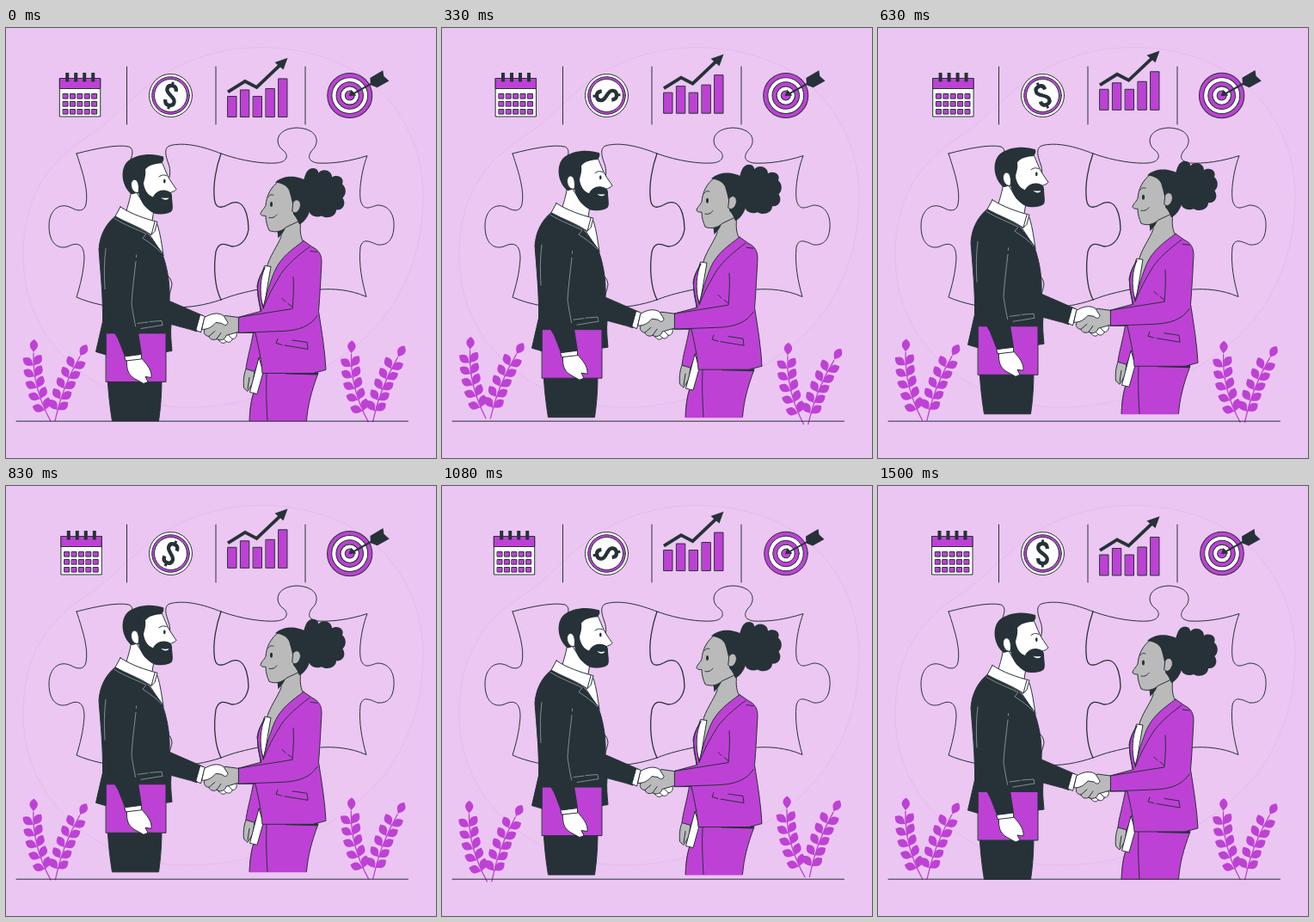
Animation of 500x500 px, one loop 1540 ms. Source, as an HTML page:

```html
<!DOCTYPE html>
<html lang="en">
<head>
<meta charset="utf-8">
<title>Business deal</title>
<style>
html, body { margin: 0; width: 100%; height: 100%; overflow: hidden; background: #ebc6f2; }
svg { display: block; width: 100%; height: 100%; }
.p { fill: #be41d5; }
.w { fill: #fff; }
.d { fill: #263238; }
.g { fill: #bababa; }
.n { fill: none; }
.o { stroke: #263238; stroke-width: 1; stroke-linejoin: round; stroke-linecap: round; }
.l { fill: none; stroke: #9aa3a7; stroke-width: .8; stroke-linecap: round; }
</style>
</head>
<body>
<svg viewBox="0 0 500 500" xmlns="http://www.w3.org/2000/svg">
  <path d="M20 265C20 200 45 160 90 130C130 105 150 72 190 50C250 15 330 15 390 42C450 70 485 130 485 195C485 300 430 360 370 395C310 430 260 441 210 441C110 440 20 370 20 265Z" fill="#ebc7f1" stroke="#e2b6ea" stroke-width=".7"/>

  <g class="n o">
    <path d="M82 146C105 140 130 135 143 138C150 141 146 150 144 156C140 175 150 190 167 190C188 190 194 172 189 158C186 150 183 140 190 137C207 132 230 138 250 146"/>
    <path d="M82 146C90 170 96 190 93 205C91 214 83 213 76 209C62 202 50 212 50 230C50 250 60 258 72 254C84 248 91 252 91 268C90 285 86 300 82 313C98 320 120 325 138 325C155 324 146 312 146 300C147 275 191 276 193 298C192 308 184 318 194 324C212 326 232 322 250 316"/>
    <path d="M250 146C245 160 240 182 242.500 200C244 211 252 209 258 205.500C262 203 267 202 271 203.500C279 207 282 222 282 234C280 247 272 254 263 254C255 252 248 247 244 260C241 280 243 302 250 316" stroke-width="1.300"/>
    <path d="M250 146C275 155 300 158 314 157C328 156 329 147 322 142C312 135 313 117 338 116C364 117 365 134 356 142C350 150 352 155 362 157C380 158 400 155 420 148.500C412 170 410 195 413 203C417 213 424 208 432 206C446 206 452 218 451 232C450 248 442 253 432 252C424 249 415 243 412 255C410 275 414 295 419 312.500C400 304 380 303 366 304M250 316C265 310 279 307 293 304"/>
  </g>
  <path class="o" d="M140.500 45V112M244 45V112M348 45V112"/>

  <g id="calendar">
    <path class="w o" d="M63 58.500H110V103H63Z"/>
    <path class="p o" d="M63 58.500H110V70.500H63Z"/>
    <path class="d" d="M69.500 52h4v10.500h-4zM79.500 52h4v10.500h-4zM89.500 52h4v10.500h-4zM99.500 52h4v10.500h-4z"/>
    <g id="days" class="p o"></g>
  </g>

  <g class="o">
    <circle class="w" cx="191.500" cy="78.500" r="25"/>
    <circle class="p" cx="191.500" cy="78.500" r="21.800"/>
    <circle class="w" cx="191.500" cy="78.500" r="19"/>
  </g>
  <g id="dollar" class="n" stroke="#263238">
    <path stroke-width="4.300" d="M5.300 -5.500C5.300 -9.500 3.500 -11.500 0 -11.500C-3.600 -11.500 -5.300 -9.500 -5.300 -6.500C-5.300 -1 5.300 1 5.300 6.500C5.300 9.500 3.600 11.500 0 11.500C-3.500 11.500 -5.300 9.500 -5.300 5.500"/>
    <path stroke-width="3" d="M0 -16V-11M0 11V16"/>
  </g>

  <g id="chart">
    <path class="p o" d="M258 80h10v24h-10zM272.800 72.500h10v31.500h-10zM287.500 80h10v24h-10zM302.300 71h10v33h-10zM317 59.500h10v44.500h-10z"/>
    <path class="n" stroke="#263238" stroke-width="3.800" d="M258 75L278 62.500L291.500 69.500L321 41.500"/>
    <path class="d" d="M327.500 35.300L312.500 40.500L322.500 49Z"/>
  </g>

  <g id="target">
    <g class="o">
      <circle class="p" cx="400" cy="78.500" r="25.300"/>
      <circle class="w" cx="400" cy="78.500" r="20.300"/>
      <circle class="p" cx="400" cy="78.500" r="15.300"/>
      <circle class="w" cx="400" cy="78.500" r="10.300"/>
      <circle class="p" cx="400" cy="78.500" r="5.300"/>
    </g>
    <path stroke="#263238" stroke-width="2" d="M401 78L428 63"/>
    <path class="d" d="M399 79L401.500 72L407.500 78.500ZM423 58.500L437.500 50L438.500 56.500L444.500 62L431 69.500L423.500 66.500Z"/>
  </g>

  <g id="plants"></g>

  <g id="people">
    <!-- man -->
    <path class="d o" d="M118 405C119 425 121 442 123.500 457.500H177.500C180 440 181 425 181 405Z"/>
    <path class="w o" d="M146 186C145 198 142 206 140 213L169 231L172 212Z"/>
    <path class="w o" d="M152 160L181 156C185 165 187 171 190 176C193 181 196 185 198 188C196 191 193 191 191 192L191 212L162 208L152 192Z"/>
    <path class="d" d="M146 194C134 184 132 164 142 155C152 147 170 145.500 183 150C184 153 183 156 180 158C173 158 166 160 162 165C163 172 161 176 160 181C161 189 165 195 171 197C174 191 180 188 186 189.500C190 190 193 192 193 196C193 203 195 209 193 213C190 217 178 218 172 216C162 211 156 202 154 192Z"/>
    <path class="w" d="M180.500 197.500C183 198.500 186 198.500 189.500 198C188 201 183 201 180.500 197.500Z"/>
    <path class="w o" d="M154 192C147 194 143 182 147 178C151 174 156 180 154 192Z"/>
    <ellipse class="d" cx="184.300" cy="178.500" rx="1.300" ry="2.500"/>
    <path class="n o" stroke-width="1.700" d="M178 173.500C181 171 184 171 187 172.500"/>
    <path class="w o" d="M163 234L176 229C180 242 181 252 183 265Z"/>
    <path class="d o" d="M127.500 219C115 229 109 243 108 258C110 285 113 315 112.500 342L104.500 377L118 381L186 377L193 376C192 365 191 356 192 345C202 348 212 350 222 353.500L229 335L190 318C191 296 187 277 181 261L164 239Z"/>
    <path class="w o" d="M133 208.500L127 219.500C140 227 156 232 169 241L173 237L176 226C161 222 146 217 133 208.500Z"/>
    <path class="n o" d="M173 226L169 241"/>
    <path class="l" d="M126 222C139 230 151 234 163 240L159 245C167 250 175 256 181 262M116 257C114 273 114 287 115 304M151.500 264.500V267M151 272C149 289 147 305 146 321C148 335 150 345 152.500 355M153 344L165 342.500M167 342L181 341L182 346L157 350"/>
    <path class="p o" d="M116.500 355.500H186V412H116.500Z"/>
    <path class="d" d="M120 345L130 362L138 382.500L158 380L153 348Z"/>
    <path class="w o" d="M140.500 386C140 398 142 403 149 408L160 414L165 412L162 406L169 407C170 398 163 391 158 385Z"/>
    <path class="w o" d="M138 382.500L157.500 380V385.500L139.500 387.500Z"/>
    <path class="w o" d="M226 334L231.500 336L226.500 354.500L221 352Z"/>

    <!-- woman, far arm and legs -->
    <path class="g o" d="M279 397C276 405 276 412 276.500 419L281 423L287 413L289 399ZM281 420L283 407"/>
    <path class="p o" d="M288 352C285 371 280 386 279 397L289 400L299 375V352Z"/>
    <path class="p" d="M298 400C285 424 283 440 283 458H349.500C351 439 355 423 363 402Z"/>
    <path class="n o" d="M298 401C285 425 284 440 283 457M303 402C302 421 303 440 304 457M363 402C355 423 351 439 349.500 457"/>
    <path class="w o" d="M294 384L283.500 424L292 426L299 401Z"/>
    <path class="d" d="M325 399L363.500 399L362 404L325 403Z"/>

    <!-- woman, head -->
    <path class="d" d="M344 181C348 176 347 167 354 164C360 162 363 166 363.500 169C368 163 379 166 379 174C386 170 394 175 391 182C396 186 396 194 391.500 198C396 205 392 213 384 212C384 220 373 223 367 219C360 222 351 218 353 211C346 212 344 205 344 200Z"/>
    <path class="g o" d="M319 232L320 243C316 254 306 266 303 280L300 326L346 250C341 241 342 232 343 222Z"/>
    <path class="d" d="M315 233L325 232C324 237 320 241 316.500 245Z"/>
    <path class="g o" d="M318 178C307 186 303 196 302 207C300 211 296 214 296 217C297 219 300 219 302 219C302 226 304 231 306 236C313 239 321 237 326 232L343 224L346 190Z"/>
    <path class="d" d="M313 180C324 170 340 173 347 177C357 186 357 205 353 214C350 223 344 228 341 229C339 224 337 220 334 217C335 210 332 199 329 189C326 183 320 181 313 180Z"/>
    <path class="g o" d="M334 203C338 197 344 202 342 209C340 215 336 217 333 214Z"/>
    <ellipse class="d" cx="308.500" cy="205.500" rx="1.500" ry="3"/>
    <path class="n o" d="M305 197C307 194 309 194 311 195M306 221C310 222 313 220 315 217.500"/>

    <!-- woman, jacket -->
    <path class="w o" d="M301 277L308 278L300 325C294 314 293 305 294 297Z"/>
    <path class="p o" d="M346 248L356 255C364 259 367 264 367 273C366 291 365 312 363.500 330C367 352 371 377 372 398L357 402L298 402C297 387 294 373 290 355L270 355V337L296 330L292 301C293 293 296 287 301 279C296 291 294 306 299 326C303 309 308 294 312 284C320 266 333 258 346 248Z"/>
    <path class="n o" d="M353 255C339 265 327 276 320 286C312 299 304 313 299 327M301 279C291 295 290 307 297 330M354 260L362 261M334 290C335 303 334 315 333 327L270 337M270 355L322 353C342 352 354 347 362 335M321 315L325 319M328 321L333 325M316 362L314 367L321 369M324 369.500L351 374L350 366L333 363.500"/>

    <!-- handshake -->
    <path class="w o" d="M244 361L249 365C251 368 255 367 256 365C259 367 263 365 263 362C267 363 269 358 268 355L259 351Z"/>
    <path class="n o" d="M256 365L252 361M263 362L258 357"/>
    <path class="g o" stroke-width=".8" d="M270 337L255 335L243 342L231 351C229 355 232 359 236 359C237 363 242 364 245 362C249 365 255 363 256 358L270 354Z"/>
    <path class="w o" d="M231 337C239 332 247 331 253 335L258 343C257 347 254 347 251 344L244 343C239 349 234 351 228 351Z"/>
    <path class="n o" stroke-width=".7" d="M236 359L243 353M245 362L250 355"/>
  </g>
  <path class="o" d="M12 457.200H467.500"/>
</svg>
<script>
const LOOP = 1540, LEAD = 41;
const el = id => document.getElementById(id);
const put = (id, value) => el(id).setAttribute('transform', value);

// Stops are [phase, value] pairs joined by straight segments.
function tween(stops, p) {
  const i = Math.max(1, stops.findIndex(s => s[0] >= p));
  const [a, u] = stops[i - 1], [b, v] = stops[i];
  return u + (v - u) * (p - a) / (b - a);
}

const FLOAT = [[0, 0], [.5, -10], [1, 0]];
const WIND = [[0, 0], [.25, 1], [.75, -1], [1, 0]];
const SHAKE = [[0, 0], [.1, -1], [.2, 2], [.3, -4], [.4, 4], [.5, -4],
  [.6, 4], [.7, -4], [.8, 2], [.9, -1], [1, 0]];
const BEAT = [[0, 1], [.1, 1.1], [.3, 1], [.4, 1], [.5, 1.1], [.6, 1], [1, 1]];

const leaf = (x, y, turn) =>
  `<path class="p" d="M0 0C-.5 -3 -4.500 -4 -4.700 -9C-4.500 -12 -2 -14 0 -15.500C2 -14 4.500 -12 4.700 -9C4.500 -4 .5 -3 0 0Z"
    transform="translate(${x} ${y}) rotate(${turn})"/>`;

function stem(x0, y0, cx, cy, x1, y1) {
  let out = `<path d="M${x0} ${y0}Q${cx} ${cy} ${x1} ${y1}" fill="none" stroke="#be41d5" stroke-width="1.3"/>`;
  const at = (a, c, b, t) => (1 - t) * (1 - t) * a + 2 * t * (1 - t) * c + t * t * b;
  const slope = (a, c, b, t) => (1 - t) * (c - a) + t * (b - c);
  const turn = t => Math.atan2(slope(x0, cx, x1, t), -slope(y0, cy, y1, t)) * 180 / Math.PI;
  for (let i = 0; i < 5; i++) {
    const t = .16 + .162 * i, x = at(x0, cx, x1, t), y = at(y0, cy, y1, t);
    out += leaf(x, y, turn(t) - 50) + leaf(x, y, turn(t) + 38);
  }
  return out + leaf(x1, y1, turn(1));
}

const plant = stem(52, 457.5, 30.5, 418, 32, 378) + stem(57, 457.5, 65, 418, 86, 382);
el('plants').innerHTML = plant + `<g transform="translate(369.5 0.5)">${plant}</g>`;

let days = '';
for (let i = 0; i < 15; i++)
  days += `<rect x="${66.7 + i % 5 * 8.4}" y="${76.5 + Math.floor(i / 5) * 9}" width="5.6" height="5.6"/>`;
el('days').innerHTML = days;

function render(ms) {
  const p = (ms + LEAD) % LOOP / LOOP;
  const lift = `translate(0 ${tween(FLOAT, p)})`;
  put('people', lift);
  put('chart', lift);
  put('calendar', `translate(${tween(SHAKE, p)} 0)`);
  put('dollar', `translate(191.5 78.5) rotate(${p * 360})`);
  put('target', `translate(409 77) scale(${tween(BEAT, p)}) translate(-409 -77)`);
  put('plants', `rotate(${tween(WIND, p)} 241 411)`);
}

const start = performance.now();
function tick() {
  render(performance.now() - start);
  requestAnimationFrame(tick);
}
tick();
</script>
</body>
</html>
```
